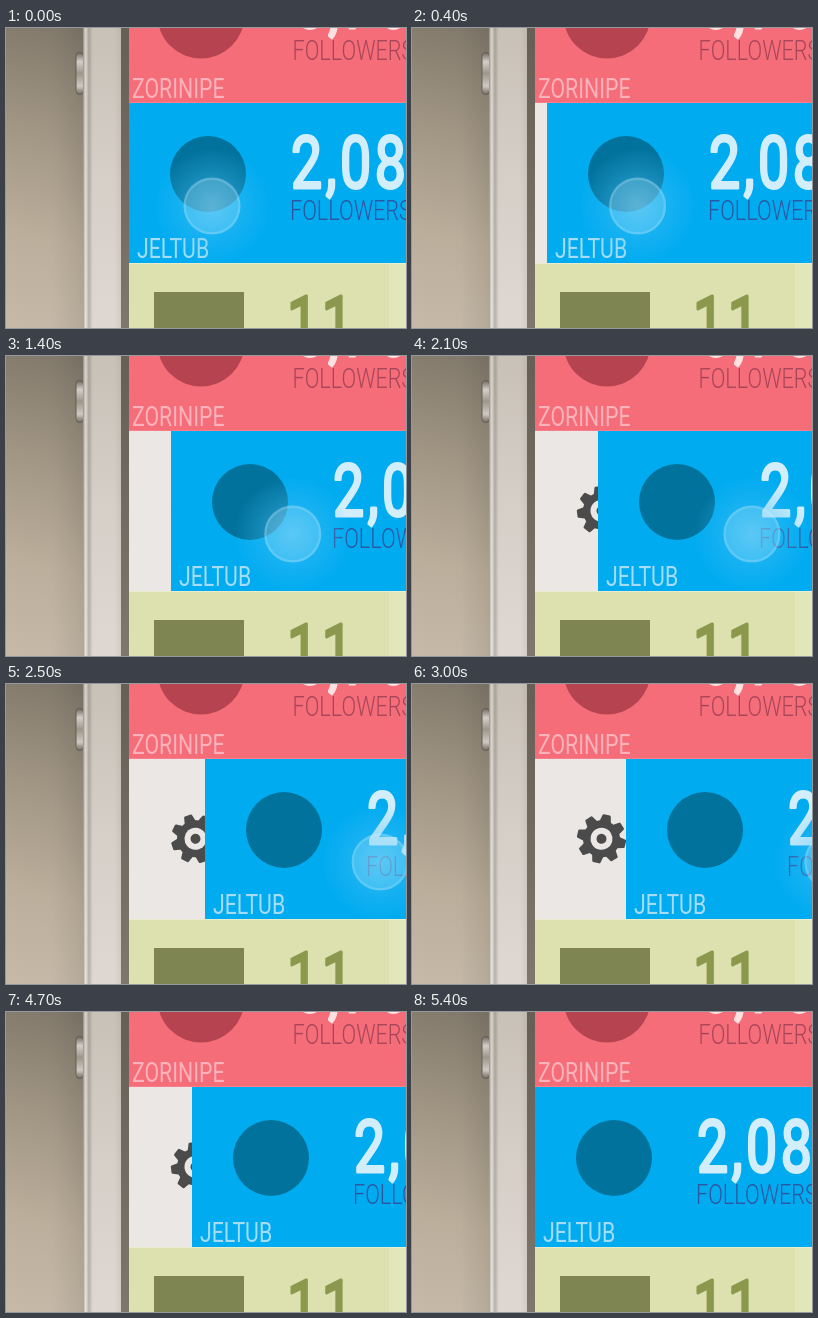
An HTML page for the animation above (5600 ms loop, 400 by 300 pixels).

```html
<!DOCTYPE html>
<html lang="en">
<head>
<meta charset="utf-8">
<title>Swipe to reveal settings</title>
<style>
  html, body { margin: 0; width: 100%; height: 100%; overflow: hidden; }
  svg { display: block; width: 100%; height: 100%; }
  text { font-family: Roboto, "Open Sans", Arial, sans-serif; }
  .label { font-size: 28.5px; font-weight: 300; }
  .name { font-size: 28px; font-weight: 400; }
  .count { font-size: 73px; font-weight: 400; letter-spacing: 4.6px;
    stroke-width: 3; stroke-linejoin: round; }
</style>
</head>
<body>
<svg viewBox="0 0 400 300" xmlns="http://www.w3.org/2000/svg">
  <defs>
    <linearGradient id="wall" x1=".3" x2="0" y2="1">
      <stop offset="0" stop-color="#7d7568"/>
      <stop offset=".35" stop-color="#9f9482"/>
      <stop offset=".7" stop-color="#bbae9b"/>
      <stop offset="1" stop-color="#c6b9a8"/>
    </linearGradient>
    <linearGradient id="shade">
      <stop offset=".6" stop-color="#000" stop-opacity="0"/>
      <stop offset="1" stop-color="#000" stop-opacity=".08"/>
    </linearGradient>
    <linearGradient id="body" x2="0" y2="1">
      <stop offset="0" stop-color="#c8c1b7"/>
      <stop offset=".5" stop-color="#d6cfc8"/>
      <stop offset="1" stop-color="#dfd8d2"/>
    </linearGradient>
    <linearGradient id="edge">
      <stop offset="0" stop-color="#5a5349" stop-opacity=".55"/>
      <stop offset=".07" stop-color="#fff" stop-opacity=".25"/>
      <stop offset=".15" stop-color="#5a5349" stop-opacity=".3"/>
      <stop offset=".25" stop-color="#5a5349" stop-opacity="0"/>
      <stop offset=".8" stop-color="#5a5349" stop-opacity="0"/>
      <stop offset="1" stop-color="#5a5349" stop-opacity=".1"/>
    </linearGradient>
    <linearGradient id="bezel" x2="0" y2="1">
      <stop offset="0" stop-color="#665f56"/>
      <stop offset="1" stop-color="#7f766c"/>
    </linearGradient>
    <linearGradient id="button" x2="0" y2="1">
      <stop offset="0" stop-color="#6f6960"/>
      <stop offset=".22" stop-color="#d3cec7"/>
      <stop offset=".5" stop-color="#9d968c"/>
      <stop offset=".8" stop-color="#cfc9c2"/>
      <stop offset="1" stop-color="#6f6960"/>
    </linearGradient>
    <radialGradient id="halo">
      <stop offset="0" stop-color="#45bff5" stop-opacity=".42"/>
      <stop offset=".5" stop-color="#45bff5" stop-opacity=".34"/>
      <stop offset="1" stop-color="#45bff5" stop-opacity="0"/>
    </radialGradient>
    <radialGradient id="disc">
      <stop offset="0" stop-color="#c8ecfb" stop-opacity=".36"/>
      <stop offset="1" stop-color="#c8ecfb" stop-opacity=".22"/>
    </radialGradient>
    <clipPath id="row"><rect x="123" y="75" width="277" height="160"/></clipPath>
  </defs>

  <rect width="400" height="300" fill="url(#wall)"/>
  <rect width="78" height="300" fill="url(#shade)"/>
  <rect x="70" y="24.5" width="7.5" height="42" rx="3.7" fill="url(#button)" stroke="#655e54"/>
  <rect x="77" width="39" height="300" fill="url(#body)"/>
  <rect x="77" width="39" height="300" fill="url(#edge)"/>
  <rect x="115" width="8" height="300" fill="url(#bezel)"/>

  <g id="top">
    <rect x="123" width="277" height="75" fill="#f66d7a"/>
    <rect x="123" y="74" width="277" height="1" fill="#fff" fill-opacity=".12"/>
    <circle cx="195" cy="-13" r="43.5" fill="#b54350"/>
  </g>

  <g id="bottom">
    <rect x="123" y="235" width="277" height="65" fill="#dce1af"/>
    <rect x="383" y="235" width="17" height="65" fill="#e2e7bb"/>
    <rect x="123" y="235" width="277" height="1" fill="#fff" fill-opacity=".35"/>
    <rect x="148" y="264" width="90" height="90" fill="#7e8553"/>
  </g>

  <g clip-path="url(#row)">
    <rect x="123" y="75" width="277" height="160" fill="#ebe7e4"/>
    <g id="gear" fill="#4b4b4b">
      <circle r="18.5"/>
      <circle r="11" fill="#ebe7e4"/>
      <circle r="5"/>
    </g>
    <g id="card">
      <rect x="123" y="75" width="277" height="160" fill="#01abf0"/>
      <circle cx="202" cy="146" r="38" fill="#00729c"/>
    </g>
    <g id="touch">
      <circle r="58" fill="url(#halo)"/>
      <circle r="28.5" fill="url(#disc)"/>
      <circle r="27.3" fill="none" stroke="#c8ecfb" stroke-opacity=".22" stroke-width="2.4"/>
    </g>
  </g>
</svg>
<script>
  const NS = "http://www.w3.org/2000/svg";
  const LOOP = 5600, STEP = 100, OPEN = 113;
  const PULL_STEPS = 37, RELEASE_STEP = 42;
  const NARROW = 0.76; // one condensed style for all lettering

  const byId = id => document.getElementById(id);
  const card = byId("card"), gear = byId("gear"), touch = byId("touch");

  function add(parent, tag, attrs, content = "") {
    const el = document.createElementNS(NS, tag);
    for (const key in attrs) el.setAttribute(key, attrs[key]);
    el.textContent = content;
    parent.appendChild(el);
  }

  function write(parent, style, x, y, fill, content) {
    add(parent, "text", {
      class: style, fill, stroke: style === "count" ? fill : "none",
      transform: `translate(${x} ${y}) scale(${NARROW} 1)`
    }, content);
  }

  write(byId("top"), "count", 287.5, 0, "#fde0e2", "5,760");
  write(byId("top"), "label", 286.5, 32.3, "#a8455a", "FOLLOWERS");
  write(byId("top"), "name", 126, 69.5, "#fab3ba", "ZORINIPE");

  write(card, "count", 285, 160, "#d3eefb", "2,084");
  write(card, "label", 284, 192.3, "#2c56a0", "FOLLOWERS");
  write(card, "name", 131, 229.5, "#a6dcf5", "JELTUB");

  write(byId("bottom"), "count", 281, 320, "#8b984d", "11");

  for (let i = 0; i < 8; i++) {
    add(gear, "path", {
      d: "M16 -6L23.5 -4.2Q24.5 -4 24.5 -3V3Q24.5 4 23.5 4.2L16 6Z",
      transform: `rotate(${i * 45})`
    });
  }

  // The pull speeds up slightly near its end; the release is a steady snap back.
  function cardOffset(n) {
    if (n <= 21) return 3 * n;
    if (n <= PULL_STEPS) return Math.round(63 + (n - 21) * 50 / 16);
    if (n <= RELEASE_STEP) return OPEN;
    return Math.max(0, OPEN - 10 * (n - RELEASE_STEP));
  }

  function draw(time) {
    const n = Math.floor((time % LOOP) / STEP);
    const pulled = Math.min(n, PULL_STEPS);
    const turn = -7 + (PULL_STEPS - pulled) * 45 / 16;
    const touchX = 206 + 4.55 * n + 0.087 * n * n;

    card.setAttribute("transform", `translate(${cardOffset(n)} 0)`);
    gear.setAttribute("transform", `translate(189.5 154.8) rotate(${turn})`);
    touch.setAttribute("transform", `translate(${touchX} 178)`);
    touch.setAttribute("visibility", n < PULL_STEPS ? "visible" : "hidden");
  }

  const start = performance.now();
  function tick() {
    draw(performance.now() - start);
    requestAnimationFrame(tick);
  }
  tick();
</script>
</body>
</html>
```
